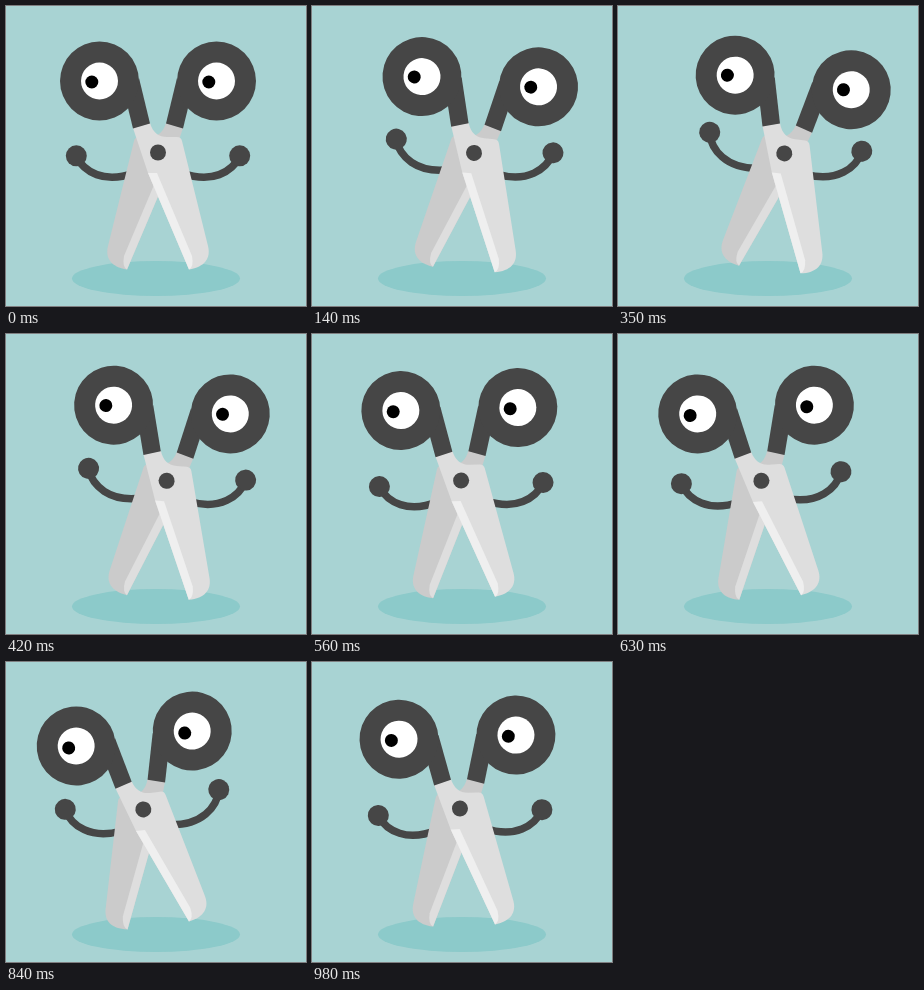
Animation of 300 by 300 pixels, one loop 1050 ms. Source, as an HTML page with a canvas:

```html
<!DOCTYPE html>
<html lang="en">
<head>
<meta charset="utf-8">
<title>Rocking scissors</title>
<style>
html, body { margin: 0; width: 100%; height: 100%; overflow: hidden; background: #a8d3d3; }
canvas { display: block; width: 100vw; height: 100vh; }
</style>
</head>
<body>
<canvas id="stage"></canvas>
<script>
const SIZE = 300, STEP = 70, STEPS = 15;
const AXIS = 152, FLOOR = 261.5;
const BG = '#a8d3d3', SHADOW = '#8ccaca', DARK = '#464646';
const canvas = document.getElementById('stage');
const ctx = canvas.getContext('2d');

// [step, value] keys with linear motion between them
const TILT = [[0, 0], [4, 10], [11, -10], [14.75, 0], [15, 0]];
const RAISE = [[0, 0], [4, 18], [8, -0.6], [11, 18], [14, -0.6], [15, 0]];

// Shapes are relative to the vertical axis of the scissors
const SHAFT = new Path2D('M-31 98 L-25 122.5 L-8 117.5 L-19 72 Z');
const BLADE = new Path2D('M-25 122 L-8 117 C-5 127 1 131 9 131 L19 131 Q23 131 24 135 ' +
  'L50 240 C53 252 47 261 31 263.5 L-10 167 Z');
const EDGE = new Path2D('M-10 167 L-1 167 L34 250 Q36 261 31 263.5 Z');
const ARM = new Path2D('M-82 150 C-74 166 -54 178 -24 167');

function valueAt(keys, x) {
  const i = keys.findIndex((k, n) => n > 0 && x <= k[0]);
  const [x0, v0] = keys[i - 1], [x1, v1] = keys[i];
  return v0 + (v1 - v0) * (x - x0) / (x1 - x0);
}

function disc(x, y, r, color) {
  ctx.fillStyle = color;
  ctx.beginPath();
  ctx.arc(x, y, r, 0, Math.PI * 2);
  ctx.fill();
}

function fill(path, color) {
  ctx.fillStyle = color;
  ctx.fill(path);
}

function turn(x, y, deg) {
  ctx.translate(x, y);
  ctx.rotate(deg * Math.PI / 180);
  ctx.translate(-x, -y);
}

function side(sign, paint) {
  ctx.save();
  ctx.scale(sign, 1);
  paint();
  ctx.restore();
}

function arm(raise) {
  turn(-15, 164, raise);
  ctx.strokeStyle = DARK;
  ctx.lineWidth = 7.5;
  ctx.stroke(ARM);
  disc(-81.7, 149.8, 10.5, DARK);
}

function half(blade, edge) {
  fill(BLADE, blade);
  fill(EDGE, edge);
  fill(SHAFT, DARK);
  disc(-58.5, 75, 39.5, DARK);
}

function eye(x) {
  disc(x, 75, 18.5, '#fff');
  disc(x - 7.7, 76, 6.5, '#000');
}

function draw(step) {
  const scaleX = canvas.width / SIZE, scaleY = canvas.height / SIZE;
  ctx.setTransform(scaleX, 0, 0, scaleY, 0, 0);
  ctx.fillStyle = BG;
  ctx.fillRect(0, 0, SIZE, SIZE);
  ctx.fillStyle = SHADOW;
  ctx.beginPath();
  ctx.ellipse(150, 272.5, 84, 17.5, 0, 0, Math.PI * 2);
  ctx.fill();

  ctx.translate(AXIS, 0);
  turn(0, FLOOR, valueAt(TILT, step));
  const raise = valueAt(RAISE, step);
  side(1, () => arm(raise));
  side(-1, () => arm(raise));
  side(-1, () => half('#cbcbcb', '#dedede'));
  side(1, () => half('#dedede', '#efefef'));
  disc(0, 146.5, 8, DARK);
  eye(-58.5);
  eye(58.5);
}

function resize() {
  const dpr = window.devicePixelRatio || 1;
  canvas.width = Math.round(innerWidth * dpr);
  canvas.height = Math.round(innerHeight * dpr);
}

const start = performance.now();
function frame() {
  const time = Math.max(0, performance.now() - start);
  draw(Math.floor(time / STEP) % STEPS);
  requestAnimationFrame(frame);
}

addEventListener('resize', resize);
resize();
frame();
</script>
</body>
</html>
```
